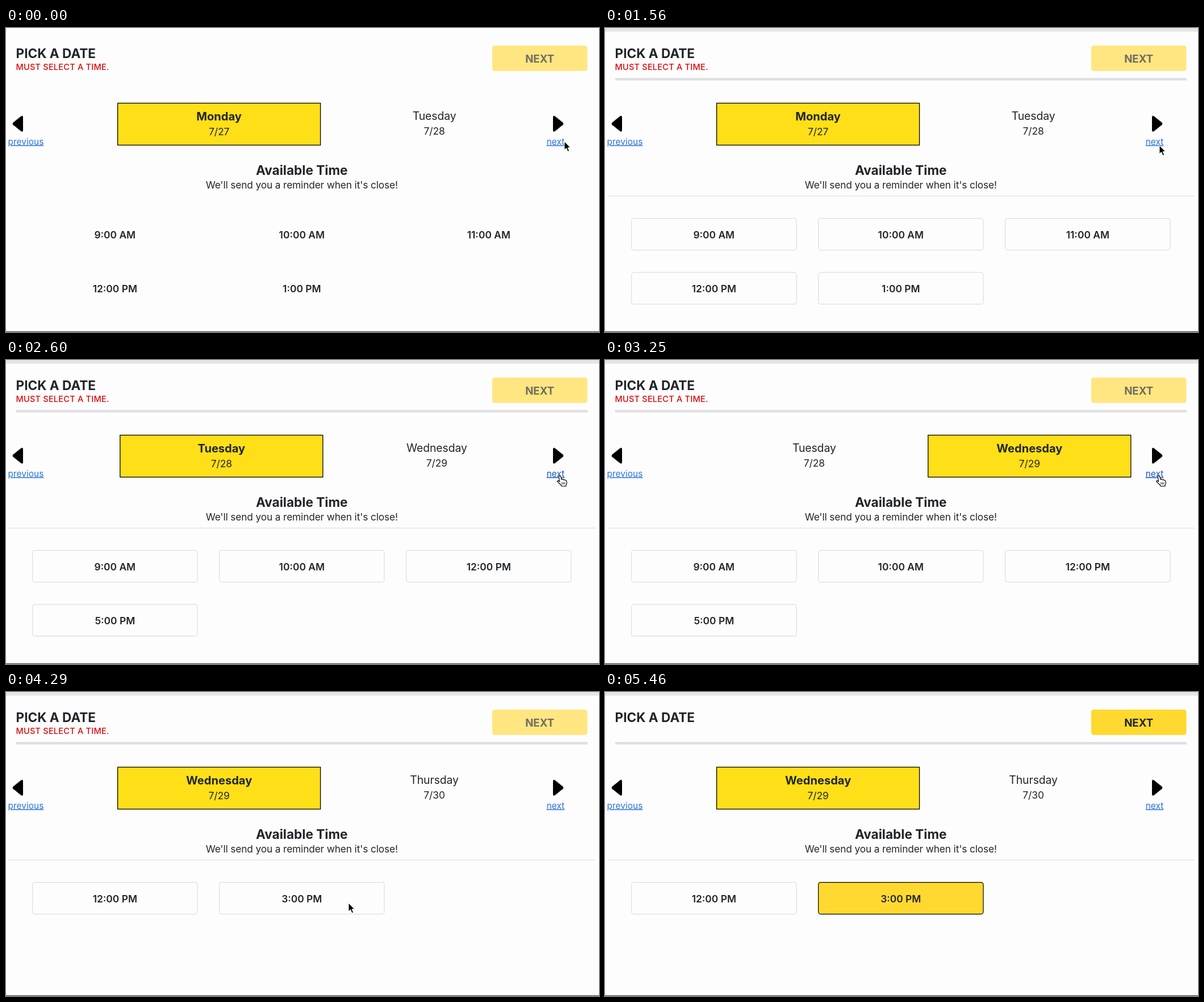
An HTML page that plays this animation: 1044 px wide and 536 px high, repeating every 5590 ms.

```html
<!DOCTYPE html>
<html lang="en">
<head>
<meta charset="utf-8">
<title>Pick a date</title>
<style>
  html, body { margin: 0; width: 100%; height: 100%; overflow: hidden; background: #fdfdfd; }
  svg { display: block; font-family: Inter, sans-serif; fill: #212529; }
  .mid { text-anchor: middle; }
  .title { font-size: 22.6px; font-weight: 700; }
  .error { font-size: 14.5px; font-weight: 500; letter-spacing: .24px; fill: #dc0808; }
  .note { font-size: 17.3px; letter-spacing: -.13px; }
  .day { font-size: 19.4px; letter-spacing: -.1px; }
  .day.on { font-size: 20.1px; font-weight: 700; letter-spacing: 0; }
  .date { font-size: 17.5px; letter-spacing: -.1px; }
  .time { font-size: 17.4px; font-weight: 600; }
  .next { font-size: 18.7px; font-weight: 700; }
  .link { font-size: 15.5px; fill: #2b73dc; text-decoration: underline; text-decoration-thickness: 1px; }
  .link.hover { fill: #1458bd; }
  .slot { fill: none; stroke: #dddee1; stroke-width: 1.2; }
  .slot.on { fill: #ffd92f; stroke: #000; }
</style>
</head>
<body>
<svg width="1044" height="536" viewBox="0 0 1044 536">
  <defs>
    <clipPath id="window"><rect x="185" y="120" width="759" height="100"/></clipPath>
    <path id="triangle" fill="#000" d="M12.2 167 L26.5 155.5 Q30 153.5 30 157.5 V180 Q30 184 26.5 182 L12.2 170.5 Q11 168.7 12.2 167Z"/>
  </defs>
  <g id="lines">
    <rect width="1044" height="6.5" fill="#e5e5e5"/>
    <rect x="18" y="88" width="1006" height="4.6" fill="#dfe0e3"/>
    <rect x="4" y="295.7" width="1034" height="1.2" fill="#e0e1e4"/>
  </g>
  <rect y="534.8" width="1044" height="1.2" fill="#454545"/>
  <text class="title" x="17.5" y="53">PICK A DATE</text>
  <text class="error" id="error" x="17.5" y="73.6">MUST SELECT A TIME.</text>
  <rect id="button" x="856" y="31" width="167.5" height="44.7" rx="4.5"/>
  <text class="next mid" id="buttonText" x="939.7" y="60.6">NEXT</text>
  <g clip-path="url(#window)"><g id="strip"></g></g>
  <use href="#triangle"/>
  <use href="#triangle" transform="translate(993) scale(-1 1)"/>
  <text class="link" x="3.5" y="205.6">previous</text>
  <text class="link" id="nextLink" x="951.7" y="205.6">next</text>
  <text class="title mid" x="520.7" y="259">Available Time</text>
  <text class="note mid" x="520.7" y="283">We'll send you a reminder when it's close!</text>
  <g id="slots"></g>
  <g id="cursor">
    <path id="arrow" fill="#000" stroke="#fff" stroke-width="1" d="M0 0V15L3.5 11.8 6 17.8 8.6 16.7 6.1 10.9H10.6Z"/>
    <g id="hand" fill="#fff" stroke="#000" stroke-width="1.2" stroke-linejoin="round">
      <path d="M4.6 11.5 3.4 3.4Q3.2 1.2 4.8 1.1T6.9 3L7.9 7.6Q10.2 6.6 11 8.2 13.2 7.4 13.9 9 16.4 8.6 16.9 10.8L17.4 14Q17 16.2 15.9 17.6V19.5H8.4Q7.2 16.8 4.6 15L1.2 11.9Q0 9.9 2 9.6Z"/>
      <path fill="none" stroke-width=".9" d="M9 12.5V16.5M11.4 12.5V16.5M13.8 12.5V16.5"/>
    </g>
  </g>
</svg>
<script>
const LOOP = 5590, STEP = 130, PITCH = 379, SLIDE = 470;
const CLICKS = [2195, 3235], PICKED = 4420;
const DAYS = [
  ["Monday", "7/27", ["9:00 AM", "10:00 AM", "11:00 AM", "12:00 PM", "1:00 PM"]],
  ["Tuesday", "7/28", ["9:00 AM", "10:00 AM", "12:00 PM", "5:00 PM"]],
  ["Wednesday", "7/29", ["12:00 PM", "3:00 PM"]],
  ["Thursday", "7/30", []],
];
// time, x, y of the pointer tip
const POINTER = [
  [0, 983, 200], [650, 976, 207], [3900, 976, 207], [4290, 603, 372], [4680, 603, 372],
  [4940, 945, 272], [5070, 945, 272], [5200, 941, 49], [5330, 387, 485], [5590, 387, 485],
];
const el = id => document.getElementById(id);
const show = (id, on) => el(id).setAttribute("visibility", on ? "visible" : "hidden");

// cubic-bezier(.25, .1, .25, 1)
function ease(p) {
  if (p <= 0 || p >= 1) return p <= 0 ? 0 : 1;
  const curve = (s, a, b) => 3 * a * s * (1 - s) ** 2 + 3 * b * s * s * (1 - s) + s ** 3;
  let low = 0, high = 1;
  for (let i = 0; i < 24; i++) {
    const mid = (low + high) / 2;
    if (curve(mid, .25, .25) < p) low = mid; else high = mid;
  }
  return curve(low, .1, 1);
}

function pointerAt(t) {
  const i = POINTER.findIndex(key => key[0] > t);
  const [t0, x0, y0] = POINTER[i - 1], [t1, x1, y1] = POINTER[i];
  const p = (t - t0) / (t1 - t0);
  return [x0 + (x1 - x0) * p, y0 + (y1 - y0) * p];
}

function dayMarkup([name, date], i, selected) {
  const x = i * PITCH, on = i === selected;
  const box = on ? `<rect x="${x - 178.5}" y="132.5" width="357" height="74" fill="#ffdf17" stroke="#000" stroke-width="1.3"/>` : "";
  return `${box}<text class="day mid ${on ? "on" : ""}" x="${x}" y="${on ? 162.8 : 161.6}">${name}</text>
    <text class="date mid" x="${x}" y="${on ? 188.6 : 187.5}">${date}</text>`;
}

function slotMarkup(label, i, lined, on) {
  const x = 46.7 + i % 3 * 329, y = 335.6 + Math.floor(i / 3) * 95.3;
  const box = lined ? `<rect class="slot ${on ? "on" : ""}" x="${x}" y="${y}" width="290.3" height="56" rx="4"/>` : "";
  return `${box}<text class="time mid" x="${x + 145.1}" y="${y + 35.2}">${label}</text>`;
}

function draw(t) {
  const lined = t >= 1430, picked = t >= PICKED, hover = t >= 1820 && t <= 3900;
  const selected = CLICKS.filter(c => t >= c).length;
  const listed = CLICKS.filter(c => t >= c + STEP).length;
  const scroll = CLICKS.reduce((sum, c) => sum + ease((t - c) / SLIDE), 0);

  show("lines", lined);
  show("error", !picked);
  el("button").setAttribute("fill", picked ? "#ffd92f" : "#ffe680");
  el("buttonText").setAttribute("fill", picked ? "#212529" : "#6d6d65");
  el("strip").setAttribute("transform", `translate(${375.1 - PITCH * scroll})`);
  el("strip").innerHTML = DAYS.map((day, i) => dayMarkup(day, i, selected)).join("");
  el("slots").innerHTML = DAYS[listed][2].map((label, i) => slotMarkup(label, i, lined, picked && i === 1)).join("");
  el("nextLink").classList.toggle("hover", hover);

  const [x, y] = hover ? [970, 203] : pointerAt(t);
  el("cursor").setAttribute("transform", `translate(${x} ${y})`);
  show("arrow", !hover && t < 5460);
  show("hand", hover);
}

let last = -1;
function tick() {
  const t = Math.floor(performance.now() % LOOP / STEP) * STEP;
  if (t !== last) draw(last = t);
  requestAnimationFrame(tick);
}
tick();
</script>
</body>
</html>
```
